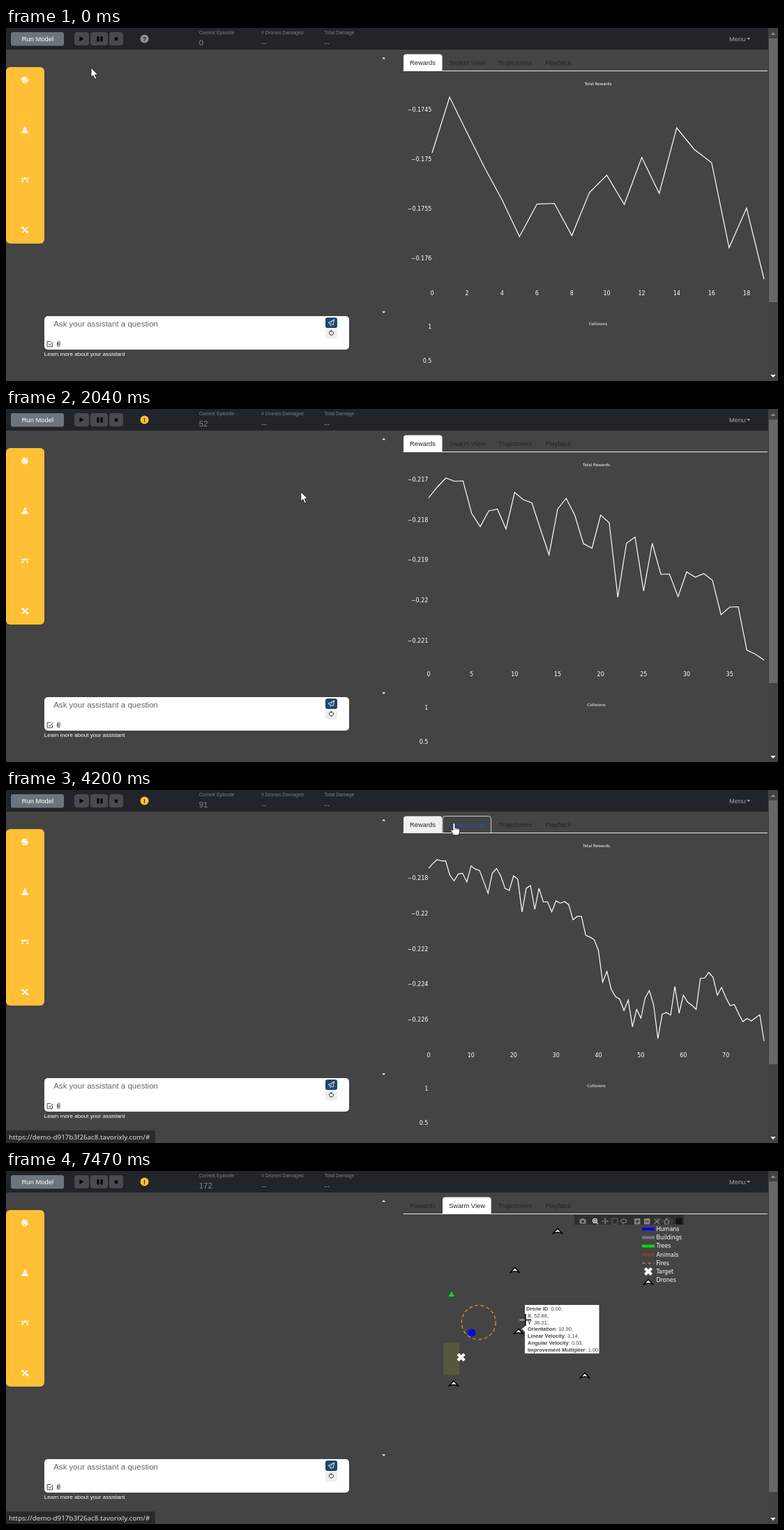
Write an HTML page that moves like this. It is 1107 px wide and 506 px high and loops after 8000 ms.

```html
<!DOCTYPE html>
<html lang="en">
<head>
<meta charset="utf-8">
<title>Swarm dashboard</title>
<style>
  html, body { margin: 0; width: 100%; height: 100%; overflow: hidden; background: #444; }
  svg { display: block; width: 1107px; height: 506px; }
  text { font-family: "Liberation Sans", Arial, sans-serif; white-space: pre; }
  .plot text { font-family: "DejaVu Sans", Verdana, sans-serif; font-size: 8px; fill: #fff; }
  .plot .title { font-size: 5.65px; }
  .ui { font-family: "Noto Sans", "Open Sans", sans-serif; }
  #cross { mix-blend-mode: difference; }
</style>
</head>
<body>
<svg id="stage" viewBox="0 0 1107 506" xmlns="http://www.w3.org/2000/svg"></svg>
<script>
const LOOP = 8000;
const stage = document.getElementById('stage');

// ---------- markup helpers ----------
const rect = (x, y, w, h, fill, r = 0, more = '') =>
  `<rect x="${x}" y="${y}" width="${w}" height="${h}" rx="${r}" fill="${fill}" ${more}/>`;
const text = (x, y, str, size, fill, more = '') =>
  `<text x="${x}" y="${y}" ${size ? `font-size="${size}"` : ''} ${fill ? `fill="${fill}"` : ''} ${more}>${str}</text>`;
const shape = (d, fill, more = '') => `<path d="${d}" fill="${fill}" ${more}/>`;
const line = (d, color, width = 1, more = '') =>
  shape(d, 'none', `stroke="${color}" stroke-width="${width}" ${more}`);
const dot = (x, y, r, fill, more = '') =>
  `<circle cx="${x}" cy="${y}" r="${r}" fill="${fill}" ${more}/>`;
const group = (id, body, more = '') => `<g id="${id}" ${more}>${body}</g>`;
const at = (x, y, body) => `<g transform="translate(${x} ${y})">${body}</g>`;

// ---------- fixed page parts ----------
const header = () =>
  rect(0, 0, 1093, 31, '#212529') +
  rect(7, 6, 76, 19.5, '#6c757d', 3) + text(22.7, 18.9, 'Run Model', 9.4, '#fff') +
  [[98, 21], [121, 25], [148, 20]].map(([x, w]) => rect(x, 6, w, 19, '#484a4c', 4)).join('') +
  shape('M105.5 12.2L111.6 15.6L105.5 19Z', '#000') +
  rect(130.5, 12, 3, 7.6, '#000', .5) + rect(135.6, 12, 3, 7.6, '#000', .5) +
  rect(155.7, 13.6, 4.4, 4.4, '#000', .6) +
  [[276.7, 'Current Episode'], [366, '# Drones Damaged'], [456.3, 'Total Damage']]
    .map(([x, s]) => text(x, 9.3, s, 7, '#7b8085')).join('') +
  text(276.7, 24.6, '0', 11.5, '#858a8f', 'id="episode"') +
  text(366, 24.6, '--', 11.5, '#858a8f') + text(456.3, 24.6, '--', 11.5, '#858a8f') +
  text(1037, 18.9, 'Menu', 9.35, '#a3a6a9') + shape('M1062 14.2h5.4l-2.7 2.8z', '#a3a6a9') +
  dot(198.6, 15.5, 6, '#909294', 'id="badge"') +
  text(198.6, 18.8, '?', 9, '#212529', 'id="mark" text-anchor="middle" font-weight="bold"');

const sidebar = () =>
  rect(0, 56, 55, 253, '#ffc035', 6) +
  dot(27, 74.5, 4.8, '#fff') + line('M23 76l3.5 .2l1.5 2.6M27.5 70.5l1.8 2.2l2.6 .4', '#ffc035', 1.1) +
  shape('M26.3 141.2h1.8l2.4 7h1.4v2.2h-9.4v-2.2h1.4z', '#fff') + line('M25 146h4.4', '#ffc035', .7) +
  line('M23.6 220Q24 216 27 215.5Q30.4 216 30.8 220M22.5 215.6h9.4', '#fff', 1) +
  rect(26, 214.3, 2.4, 2.4, '#fff') + rect(22.6, 218.8, 2.2, 2.2, '#fff') + rect(29.8, 218.8, 2.2, 2.2, '#fff') +
  dot(22.6, 215.6, .9, '#fff') + dot(31.8, 215.6, .9, '#fff') +
  line('M23.5 286l7.4 7.2', '#fff', 2) + line('M31.4 285.4l-8 8', '#fff', 1.5) +
  dot(24, 286.4, 1.7, '#fff') + dot(30.6, 292.8, 1.8, '#fff');

const assistant = () =>
  rect(55, 413, 437, 48, '#fff', 5) +
  text(68.2, 428, 'Ask your assistant a question', 11.53, '#666') +
  rect(458, 415, 17, 15, '#20476b', 3) +
  line('M470.6 418l-8.6 4.4l2.8 1.3l.6 3l1.7-2l2.2 .9zM470.6 418l-5.8 5.7', '#fff', .8) +
  rect(458, 431, 17, 14, '#eee', 3) +
  line('M468.6 435a3 3 0 1 1-3.4-.6', '#222', 1) + shape('M465.6 432.8l2.6 1.5l-2.6 1.6z', '#222') +
  line('M66.6 452.6v4.2h-7.4v-7.4h5', '#333', .9) + line('M61 452.6l2 2l4.4-4.8', '#333', 1) +
  line('M73.4 450.4v4.4a1.9 1.9 0 0 0 3.8 0v-5a1.4 1.4 0 0 0-2.7 0v4.6a.7.7 0 0 0 1.4 0v-3.6', '#444', .8) +
  text(54.7, 469.6, 'Learn more about your assistant', 8.09, '#fff') +
  shape('M539.3 44.3h4.8l-2.4-2.6z', '#fff') + shape('M539.3 406.2h4.8l-2.4 2.6z', '#fff');

const scrollbar = () =>
  rect(1093, 0, 14, 506, '#424242') + rect(1094, 15, 12, 378, '#686868', 0, 'id="thumb"') +
  shape('M1096.3 10h7.4l-3.7-4z', '#868686') + shape('M1096.3 497h7.4l-3.7 4z', '#fff');

const tabTop = (x, w) => `M${x} 61.5V41.5a4 4 0 0 1 4-4h${w - 8}a4 4 0 0 1 4 4V61.5`;
const tabs = () =>
  shape(tabTop(570, 55.5), '#fff', 'id="rewardsTab"') +
  shape(tabTop(626, 69.7), '#fff', 'id="swarmTab"') +
  line('M569.5 61.5H1092', '#e4e6e8') +
  line(tabTop(626, 69.5), '#e9ecef', .8, 'id="swarmEdge"') +
  [[579, 'Rewards'], [635.2, 'Swarm View', 'id="swarmLabel"'], [706, 'Trajectories'], [773, 'Playback']]
    .map(([x, s, id]) => text(x, 52.5, s, 9.35, '#212529', id)).join('');

const tooltip = () =>
  rect(209, 4, 54, 30.5, '#fff', 4) + shape('M209.5 12l-4.5 4l4.5 4z', '#fff') +
  text(218.3, 22.4, 'Running...', 7.5, '#333', 'class="ui"');

const statusBar = () =>
  shape('M0 488H211a3 3 0 0 1 3 3V506H0Z', '#292a2b') +
  text(4, 500.8, 'https://demo-d917b3f26ac8.tavorixly.com/#', 9.8, '#dcdcdc', 'class="ui"');

// ---------- reward charts ----------
const early = [179, 99, 150, 200, 246, 299, 252.5, 251.5, 297.5, 236, 211, 253, 185.5, 237,
  143, 174, 193, 315, 258, 360];
const middle = [127.5, 112, 99, 103.5, 103, 149.5, 168.5, 146, 143.5, 172, 119.5, 130, 134.5, 172,
  209, 143.5, 128, 152.5, 193, 199.5, 152, 163, 270, 192.5, 183.5, 261, 192.5, 237, 236.5, 269,
  233.5, 241, 236, 245.5, 295, 284, 283.5, 345.5, 351.5, 360];
const late = [230, 275.5, 260, 285.5, 296, 300, 316, 301, 339.5, 314.5, 327, 298, 287.5, 308, 356.5,
  321.5, 319, 322.5, 281.5, 320, 294, 304, 308.5, 314.5, 270, 269.5, 261.5, 268.5, 294, 283, 297.5,
  309, 307.5, 320.5, 332, 327.5, 331, 326.5, 322, 360];

function chart({ left, ys, xStep, yLabels, yTop, yGap }) {
  const right = 1087, dx = (right - left) / (ys.length - 1), mid = (left + right) / 2;
  const end = 'text-anchor="end"', center = 'text-anchor="middle"';
  let out = line('M' + ys.map((y, i) => `${(left + i * dx).toFixed(1)} ${y.toFixed(1)}`).join('L'), '#fff', 1.2);
  yLabels.forEach((s, i) => out += text(left - .6, yTop + i * yGap + 2.9, '\u2212' + s, 0, '', end));
  for (let i = 0; i < ys.length; i += xStep) out += text(left + i * dx, 383, i, 0, '', center);
  out += text(left - .6, 431.2, '1', 0, '', end) + text(left - .6, 479.6, '0.5', 0, '', end);
  const title = center + ' class="title"';
  return out + text(mid, 82.3, 'Total Rewards', 0, '', title) + text(mid, 425.7, 'Collisions', 0, '', title);
}
const charts = [
  { left: 611, ys: early, xStep: 2, yLabels: ['0.1745', '0.175', '0.1755', '0.176'], yTop: 117, yGap: 70.9 },
  { left: 606, ys: middle, xStep: 5, yLabels: ['0.217', '0.218', '0.219', '0.22', '0.221'], yTop: 100.7, yGap: 57.9 },
  { left: 606, ys: middle.map(y => 100.6 + (y - 101) * .4403).concat(late), xStep: 10,
    yLabels: ['0.218', '0.22', '0.222', '0.224', '0.226'], yTop: 125.7, yGap: 50.95 }
].map(chart);

// ---------- swarm view ----------
const droneIcon = shape('M-7.3 4.3L0-3.6L7.3 4.3Q0-.8-7.3 4.3Z', '#fff', 'stroke="#000" stroke-width="1.4"');
const targetIcon = line('M-4.6-4.6L4.6 4.6M4.6-4.6L-4.6 4.6', '#fff', 4.2);
const fire = 'stroke="#e09a2b" stroke-width="1.2" stroke-dasharray="5 3.4"';

// Each row: x, y at one update and x, y at the next
const drones = [[798, 86, 791, 86], [737.3, 138.3, 729.7, 142], [743.6, 213, 735, 230],
  [831, 280.5, 830, 293], [641.3, 304.5, 642, 304.5]];
const things = {
  tree: [648.8, 167.5, 638.8, 176.8], fire: [686.3, 206, 677.7, 217], human: [676.8, 220.4, 667.8, 231.8],
  target: [662, 254.3, 652.6, 267], house: [813.6, 189.6, 810, 200],
  zone: [638, 234, 627.3, 246], zoneSize: [21.5, 45, 22.7, 46.5]
};

function swarm(k) {
  const mix = ([x, y, u, v]) => [x + (u - x) * k, y + (v - y) * k];
  const p = Object.fromEntries(Object.entries(things).map(([name, row]) => [name, mix(row)]));
  return rect(...p.zone, ...p.zoneSize, '#56573d') +
    at(...p.tree, shape('M0-4.2L4.2 3.2H-4.2Z', '#10d810')) +
    at(...p.house, rect(-2.6, -2.6, 5.2, 5.2, '#7b7b7b')) +
    dot(...p.fire, 23.5 + k, 'none', fire) + dot(...p.human, 5.6, '#0808f0') +
    at(...p.target, targetIcon) +
    drones.map(d => at(...mix(d), droneIcon)).join('');
}

const legend = () =>
  rect(912, 69, 18, 4, '#56573d') +
  ['No Fly', 'Humans', 'Buildings', 'Trees', 'Animals', 'Fires', 'Target', 'Drones']
    .map((s, i) => text(932.5, 73.8 + i * 12.2, s, 0)).join('') +
  ['#0000f5', '#777', '#08dc08', '#7b4520']
    .map((c, i) => rect(912, 81.2 + i * 12.2, 18, 4, c)).join('') +
  shape('M912 132h18', 'none', fire) + at(921, 144, targetIcon) + at(921, 159, droneIcon);

const modebar = () => {
  const c = '#858585';
  return rect(815, 63, 157, 14, '#2b2b2b', 0, 'opacity=".82"') +
    rect(822.5, 69.3, 9, 6.2, c, 1) + rect(825, 68, 4, 2, c) + dot(827, 72.3, 1.9, '#2b2b2b') +
    dot(844.4, 71.3, 2.9, 'none', 'stroke="#ddd" stroke-width="1.4"') +
    line('M846.6 73.6l2.6 2.6M842.9 71.3h3M844.4 69.8v3', '#ddd', 1.2) +
    line('M855 72h8.4M859.2 67.8v8.4', c, 1) +
    shape('M854.4 72l2-1.6v3.2zM864 72l-2-1.6v3.2zM859.2 67.2l-1.6 2h3.2zM859.2 76.8l-1.6-2h3.2z', c) +
    rect(869, 68, 8, 8, 'none', 0, `stroke="${c}" stroke-dasharray="1.6 1"`) +
    line('M884.5 76.5l-.3-2.4a4 2.7 0 1 1 2.2 .2q-1.8 .5-2.2-1', c, 1.1) +
    rect(901, 68, 8.4, 8.4, c) + line('M902.6 72.2h5.2M905.2 69.6v5.2', '#2b2b2b', 1.2) +
    rect(915, 68, 8.4, 8.4, c) + line('M916.6 72.2h5.2', '#2b2b2b', 1.2) +
    line('M929.5 68.4l7.6 7.6M937.1 68.4l-7.6 7.6', c, 1.3) +
    line('M943 72.4l4.2-3.8l4.2 3.8M944.6 72v4h5.2v-4', c, 1.2) +
    rect(960.5, 67.5, 9, 9, '#111');
};

const readings = [
  ['57.46', '41.72', '10.87', '3.14', '0.03'],
  ['52.88', '36.21', '10.90', '3.14', '0.03']
];
function hoverCard(i) {
  const names = ['X', 'Y', 'Orientation', 'Linear Velocity', 'Angular Velocity'];
  const rows = [['Drone ID', '0.00,'], ...names.map((n, j) => [n, readings[i][j] + ',']),
    ['Improvement Multiplier', '1.00']];
  return rect(0, -34.5, 106.5, 69.5, '#fff') + shape('M.5-4L-4.5 0L.5 4z', '#fff') +
    rows.map(([n, v], j) => text(j ? 4 : 2, -26.2 + j * 9.7,
      `<tspan font-weight="bold">${n}</tspan>: ${v}`, 7.5, '#444')).join('');
}

// ---------- pointers ----------
const arrow = shape('M0 0V13.6L3.1 10.8L5.4 16.2L7.7 15.2L5.4 9.9H9.7Z', '#fff',
  'stroke="#111" stroke-width=".8"');
const hand = shape('M-1.6 1.2a1.6 1.6 0 0 1 3.2 0V6.3L6.5 7.4Q8.6 8 8.4 10.2L7.6 14.8Q7.3 17.2 5 17.2H.8' +
  'Q-1 17.2-2 15.4L-4.4 11Q-5 9.4-3.6 9.2Q-2.6 9.2-1.6 10.4Z', '#fff', 'stroke="#111" stroke-width=".9"') +
  line('M1.6 6.3v3M4 7v2.6M6.2 7.6v2.4', '#111', .7);
const cross = line('M-8.5 0H8.5M0-8.5V8.5', '#fff', 1.6);

stage.innerHTML = rect(0, 0, 1107, 506, '#444') + header() + sidebar() + assistant() + tabs() +
  group('rewards', '', 'class="plot"') +
  group('swarmPlot', group('field', '') + legend(), 'class="plot"') +
  group('modebar', modebar()) + group('card', '') + scrollbar() +
  group('tooltip', tooltip()) + group('status', statusBar()) +
  group('arrow', arrow) + group('hand', hand) + group('cross', cross);

// ---------- timeline ----------
const steps = {
  episode: [[0, 0], [2040, 52], [3840, 91], [5670, 131], [7470, 172]],
  chart: [[0, 0], [1980, 1], [3540, 2]],
  swarm: [[0, -1.6], [5340, -.8], [6180, 0], [7140, 1]],
  pointer: [[0, 'arrow'], [2310, 'hand'], [4710, 'cross']]
};
const route = [[0, 122, 57], [540, 200, 20], [870, 200, 20], [1290, 288.5, 50], [1620, 288.5, 50],
  [1665, 305, 27], [1800, 392, 132], [1920, 392, 132], [2400, 586.6, 48.5], [2880, 586.6, 48.5],
  [3150, 642.4, 47.6], [4620, 642.4, 47.6], [4860, 678, 108.5], [6420, 678, 108.5],
  [6540, 741.3, 200.5], [6750, 744.8, 213.5], [LOOP, 744.8, 213.5]];

const $ = id => document.getElementById(id);
const held = (table, t) => table.reduce((v, [start, value]) => t >= start ? value : v, table[0][1]);
const show = (id, on) => $(id).setAttribute('display', on ? 'inline' : 'none');
const clamp = v => Math.min(1, Math.max(0, v));

function pointerAt(t) {
  const i = route.findIndex(([end]) => t < end);
  const [t0, x0, y0] = route[i - 1], [t1, x1, y1] = route[i];
  const u = (t - t0) / (t1 - t0), e = u * u * (3 - 2 * u);
  return [x0 + (x1 - x0) * e, y0 + (y1 - y0) * e];
}

const last = {};
function fill(id, key, make) {
  if (last[id] !== key) { last[id] = key; $(id).innerHTML = make(); }
}

function draw(t) {
  const running = t >= 270, swarmOpen = t >= 4260;
  $('badge').setAttribute('fill', running ? '#ffc035' : '#909294');
  $('mark').textContent = running ? '!' : '?';
  $('episode').textContent = held(steps.episode, t);
  show('tooltip', t >= 450 && t < 990);
  show('status', t >= 2340);

  const hover = clamp((t - 3000) / 150);
  show('rewardsTab', !swarmOpen);
  $('rewardsTab').setAttribute('fill', t >= 4170 ? '#eff0f0' : '#fff');
  show('swarmTab', swarmOpen);
  $('swarmEdge').setAttribute('opacity', swarmOpen ? 0 : hover);
  $('swarmLabel').setAttribute('fill', !swarmOpen && hover > .3 ? '#1c55b4' : '#212529');
  $('thumb').setAttribute('height', swarmOpen ? 445 : 378);

  const chartNo = held(steps.chart, t), k = held(steps.swarm, t);
  show('rewards', !swarmOpen);
  fill('rewards', chartNo, () => charts[chartNo]);
  show('swarmPlot', t >= 4440);
  fill('field', k, () => swarm(k));
  show('modebar', t >= 4710);

  const moved = t >= 7140 ? 1 : 0;
  show('card', t >= 6600);
  fill('card', moved, () => hoverCard(moved));
  $('card').setAttribute('transform', moved ? 'translate(744 226.5)' : 'translate(752.6 209.5)');

  const kind = held(steps.pointer, t);
  for (const id of ['arrow', 'hand', 'cross']) show(id, id === kind);
  $(kind).setAttribute('transform', `translate(${pointerAt(t).map(v => v.toFixed(2)).join(' ')})`);
}

const start = performance.now();
function tick() {
  draw((performance.now() - start) % LOOP);
  requestAnimationFrame(tick);
}
tick();
</script>
</body>
</html>
```
